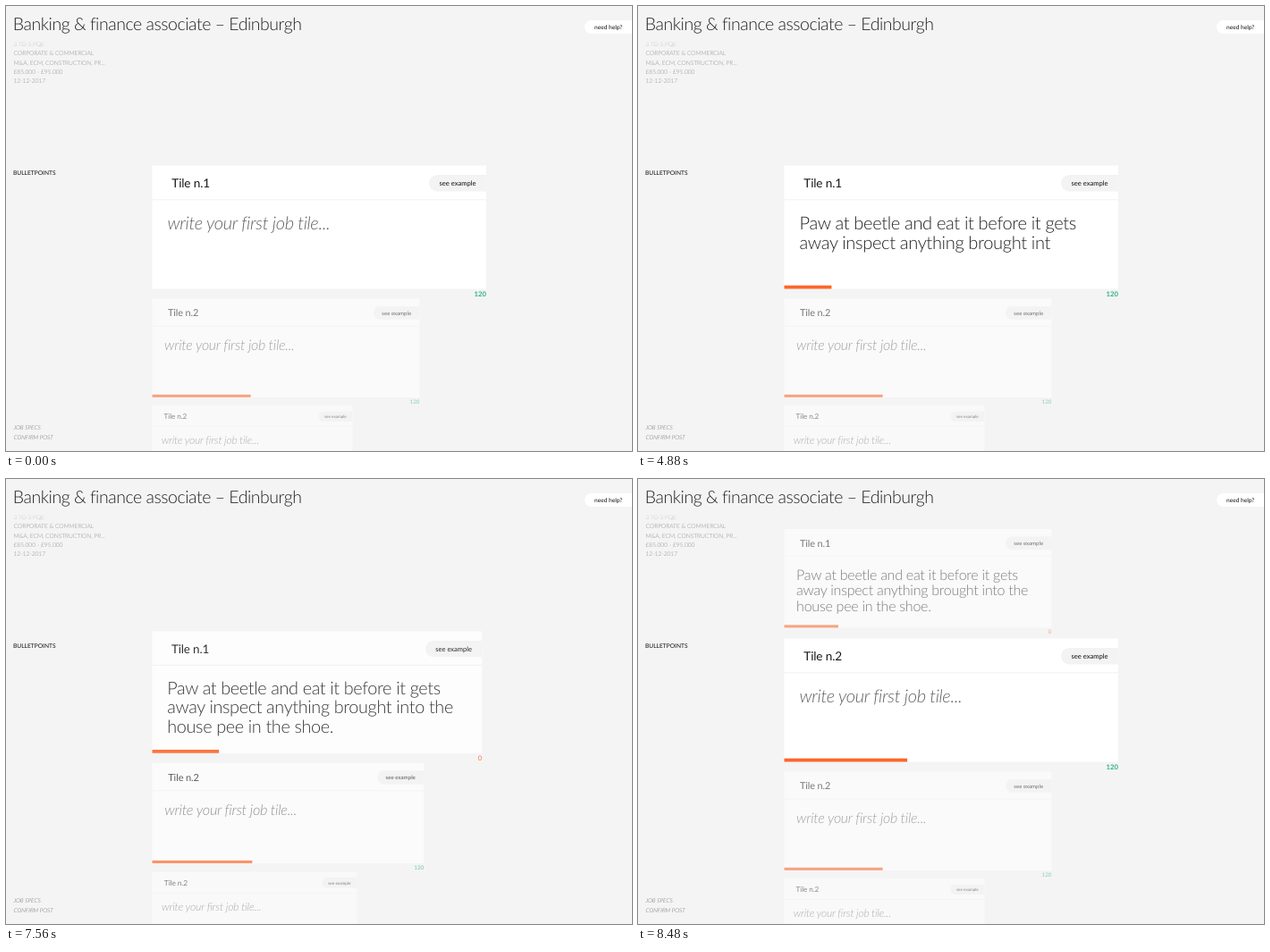
Write an HTML page that moves like this. It is 700 px wide and 498 px high and loops after 9200 ms.

```html
<!DOCTYPE html>
<html lang="en">
<head>
<meta charset="utf-8">
<title>Job tiles</title>
<style>
  html, body { margin: 0; width: 100%; height: 100%; overflow: hidden; background: #f4f4f4; }
  svg { display: block; width: 700px; height: 498px; }
  text { font-family: Lato, "Open Sans", sans-serif; text-rendering: geometricPrecision; white-space: pre; }
  .title { font-size: 19.5px; font-weight: 300; letter-spacing: -0.47px; fill: #222; }
  .side { font-size: 6.7px; font-weight: 300; letter-spacing: -0.05px; fill: #8a8a8a; }
  .step { font-size: 6.5px; font-weight: 300; font-style: italic; fill: #666; }
  .current { font-size: 6.65px; fill: #111; }
  .help { font-size: 6.6px; fill: #111; }
  .name { font-size: 13.6px; letter-spacing: -0.14px; fill: #181818; }
  .example { font-size: 7.6px; fill: #111; }
  .hint, .body { font-size: 20.1px; font-weight: 300; letter-spacing: -0.36px; }
  .hint { font-style: italic; fill: #626262; }
  .body { fill: #222; }
  .count { font-size: 7.7px; text-anchor: end; fill: #2fb18c; }
</style>
</head>
<body>
<svg id="stage" viewBox="0 0 700 498">
  <defs>
    <linearGradient id="fade" x1="0" y1="0" x2="0" y2="1">
      <stop offset="0" stop-color="#f4f4f4"/>
      <stop offset="1" stop-color="#f4f4f4" stop-opacity="0"/>
    </linearGradient>
  </defs>
  <rect width="700" height="498" fill="#f4f4f4"/>
</svg>
<script>
const LOOP = 9200;
const TYPE_START = 2200, COUNT_SWAP = 5920;
const SLIDE_START = 7160, SLIDE_TIME = 1322, FADE_TIME = 1200;
const LEFT = 163.5, WIDTH = 373.5, HEIGHT = 138;
const ORANGE = '#fe6529', GREEN = '#2fb18c';
const LINES = [
  'Paw at beetle and eat it before it gets',
  'away inspect anything brought into the',
  'house pee in the shoe.'
];
// [time, value]
const TYPED = [[2200, 0], [3120, 26.2], [4880, 73.5], [5960, 101]];
const BAR = [[2200, 0], [6000, 75], [6400, 75.6]];
// [slot, value]; slot 0 is the active tile
const SLOT_Y = [[-1, 56], [0, 178.5], [1, 327.5], [2, 447.5], [3, 541]];
const SLOT_SCALE = [[-1, 0.8], [0, 1], [1, 0.8], [2, 0.6], [3, 0.4]];
const SLOT_ALPHA = [[-1, 0.56], [0, 1], [1, 0.56], [2, 0.48], [3, 0.4]];

const stage = document.getElementById('stage');

function add(parent, tag, attrs, content) {
  const el = document.createElementNS('http://www.w3.org/2000/svg', tag);
  for (const key in attrs) el.setAttribute(key, attrs[key]);
  if (content) el.textContent = content;
  return parent.appendChild(el);
}

const label = (parent, cls, x, y, content) =>
  add(parent, 'text', { class: cls, x, y }, content);

function pill(parent, x, y, right, h, fill) {
  const r = h / 2;
  add(parent, 'path', { fill, d: `M${right} ${y}H${x + r}a${r} ${r} 0 0 0 0 ${h}H${right}z` });
}

function lerp(table, x) {
  if (x <= table[0][0]) return table[0][1];
  for (let i = 1; i < table.length; i++) {
    const [x0, y0] = table[i - 1], [x1, y1] = table[i];
    if (x <= x1) return y0 + (y1 - y0) * (x - x0) / (x1 - x0);
  }
  return table[table.length - 1][1];
}

function smooth(x) {
  const s = Math.min(1, Math.max(0, x));
  return s * s * (3 - 2 * s);
}

// cubic-bezier(.9, 0, 0, 1)
function ease(x) {
  if (x <= 0) return 0;
  if (x >= 1) return 1;
  let lo = 0, hi = 1;
  for (let i = 0; i < 30; i++) {
    const s = (lo + hi) / 2;
    if (2.7 * s * (1 - s) ** 2 + s ** 3 < x) lo = s; else hi = s;
  }
  return smooth(lo);
}

function makeTile(index) {
  const g = add(stage, 'g', {});
  add(g, 'rect', { width: WIDTH, height: HEIGHT, fill: '#fff' });
  add(g, 'rect', { y: 37.8, width: WIDTH, height: 1, fill: '#f1f1f1' });
  label(g, 'name', 21.8, 24.8, index ? 'Tile n.2' : 'Tile n.1');
  pill(g, 309.5, 10.5, WIDTH, 18.5, '#f3f3f3');
  label(g, 'example', 321, 22.7, 'see example');
  return {
    g,
    hint: label(g, 'hint', 17, 71.3, 'write your first job tile...'),
    bar: add(g, 'rect', { y: 134.2, width: index ? 137.6 : 0, height: 3.8, fill: ORANGE }),
    count: label(g, 'count', WIDTH, 146.3, '120')
  };
}

const tiles = [0, 1, 2, 3].map(makeTile);
const first = tiles[0];
const rows = LINES.map((_, i) => label(first.g, 'body', 17, 71.3 + 21.8 * i));

label(stage, 'side', 8.5, 45.2, '3 TO 5 PQE');
add(stage, 'rect', { y: 36, width: 550, height: 14, fill: 'url(#fade)' });
label(stage, 'side', 8.5, 54.8, 'CORPORATE & COMMERCIAL');
label(stage, 'side', 8.5, 65.5, 'M&A, ECM, CONSTRUCTION, PR...');
label(stage, 'side', 8.5, 75.6, '£85.000 - £95.000');
label(stage, 'side', 8.5, 85.7, '12-12-2017');
label(stage, 'title', 7.8, 27.3, 'Banking & finance associate – Edinburgh');
label(stage, 'current', 8, 189.4, 'BULLETPOINTS');
label(stage, 'step', 8.5, 474.3, 'JOB SPECS');
label(stage, 'step', 8.5, 484.6, 'CONFIRM POST');
pill(stage, 647, 16, 700, 15, '#fff');
label(stage, 'help', 658, 26, 'need help?');

function draw(t) {
  const typed = Math.floor(lerp(TYPED, t));
  let from = 0;
  LINES.forEach((line, i) => {
    rows[i].textContent = line.slice(0, Math.max(0, typed - from));
    from += line.length + 1;
  });
  first.hint.style.display = t < TYPE_START ? '' : 'none';
  first.bar.setAttribute('width', lerp(BAR, t));

  const full = t >= COUNT_SWAP;
  first.count.textContent = full ? '0' : '120';
  first.count.style.fill = full ? ORANGE : GREEN;

  const shift = ease((t - SLIDE_START) / SLIDE_TIME);
  const fade = smooth((t - SLIDE_START) / FADE_TIME);
  tiles.forEach((tile, i) => {
    const slot = i - shift;
    tile.g.setAttribute('transform',
      `translate(${LEFT} ${lerp(SLOT_Y, slot)}) scale(${lerp(SLOT_SCALE, slot)})`);
    tile.g.setAttribute('opacity', lerp(SLOT_ALPHA, i - fade));
    const bold = Math.abs(slot) < 0.3 && !(i === 0 && full);
    tile.count.style.fontWeight = bold ? 700 : 400;
  });
}

function tick() {
  draw(performance.now() % LOOP);
  requestAnimationFrame(tick);
}
tick();
</script>
</body>
</html>
```
